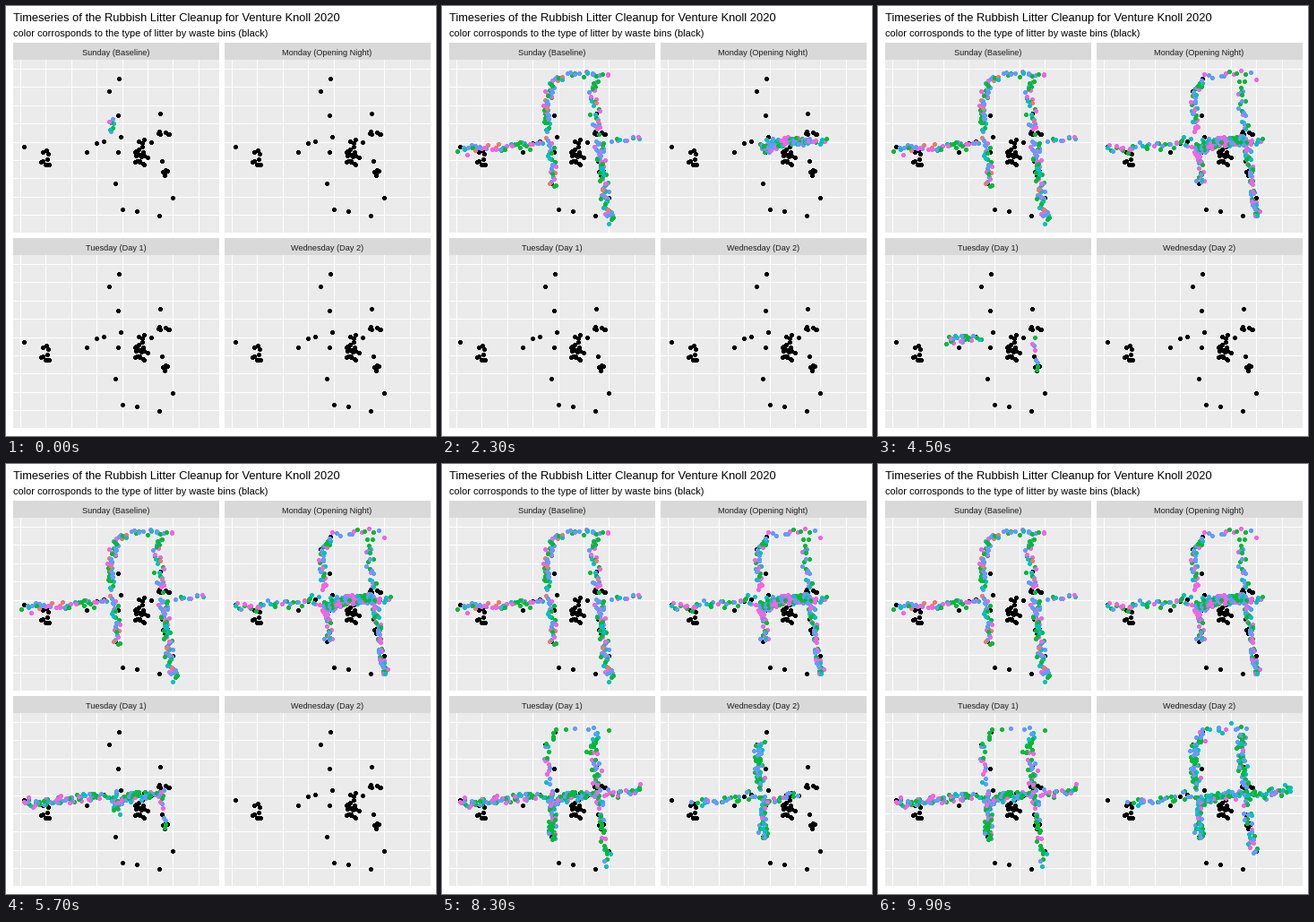
A matplotlib script for the animation above (10000 ms loop, 480x480 px).

```python
import numpy as np
import matplotlib.pyplot as plt
from matplotlib.animation import FuncAnimation
from matplotlib.patches import Rectangle

SIZE, FRAMES, STEP = 480, 100, 100
PX = 0.72  # points per pixel at 100 dpi
PITCH = np.array([236, 218])
HUES = {"r": "#F8766D", "g": "#00BA38", "t": "#00BFC4",
        "b": "#619CFF", "p": "#F564E3", "k": "#000000"}

# Streets and bins are shared by all panels, in pixels of the first one
STREETS = {
    "up": [(118, 140), (116, 112), (119, 97), (125, 82)],
    "down": [(121, 150), (122, 175), (124, 200)],
    "top": [(127, 79), (155, 76), (187, 78)],
    "right": [(171, 82), (167, 100), (171, 122), (174, 142)],
    "mid": [(122, 160), (142, 152), (176, 150)],
    "east": [(178, 151), (202, 149), (224, 145)],
    "west": [(112, 152), (75, 156), (42, 159), (20, 160)],
    "south": [(174, 152), (178, 182), (183, 210), (187, 240)],
}
LONE_BINS = [(126, 81), (115, 95), (125, 122), (172, 120), (128, 146),
             (109, 151), (101, 153), (90, 163), (125, 163), (20, 157),
             (122, 198), (186, 214), (130, 227), (146, 229), (171, 234)]
# Centre, spread and number of bins
BIN_GROUPS = [((151, 167), (5, 6), 24), ((44, 169), (2, 8), 9),
              ((171, 143), (1, 1), 3), ((181, 143), (2, 1), 3),
              ((178, 186), (2, 5), 6)]

# Title, start and end in ms, colour mix, then (street, pieces, share walked)
DAYS = [
    ("Sunday (Baseline)", 0, 1700, "gggttbbbppr",
     [("up", 45, 1), ("top", 22, 1), ("right", 32, 1), ("west", 46, 1),
      ("down", 30, 1), ("east", 12, 1), ("south", 75, 1)]),
    ("Monday (Opening Night)", 1700, 4150, "gggttbbbppp",
     [("mid", 96, 1), ("east", 8, 0.4), ("down", 36, 1), ("up", 34, 1),
      ("top", 13, 1), ("right", 22, 1), ("mid", 48, 1), ("west", 42, 1),
      ("mid", 48, 1), ("south", 58, 0.95)]),
    ("Tuesday (Day 1)", 4200, 7100, "ggggtbbpp",
     [("south", 8, 0.45), ("west", 80, 1), ("mid", 66, 1), ("down", 40, 1),
      ("up", 18, 1), ("top", 6, 1), ("right", 40, 1), ("east", 20, 1),
      ("down", 14, 1), ("south", 26, 0.9)]),
    ("Wednesday (Day 2)", 7200, 9900, "ggggttbbbp",
     [("mid", 20, 0.7), ("down", 50, 1), ("west", 28, 0.75), ("up", 64, 1),
      ("top", 12, 0.8), ("south", 30, 0.75), ("right", 60, 1),
      ("mid", 50, 1), ("east", 36, 1)]),
]

rng = np.random.default_rng(20)


def walk(street, n, share):
    """Scatter n points, in order, along the first part of a street."""
    route = np.array(STREETS[street], float)
    reach = np.r_[0, np.cumsum(np.hypot(*np.diff(route, axis=0).T))]
    s = (np.arange(n) + rng.random(n)) / n * share * reach[-1]
    path = np.column_stack([np.interp(s, reach, c) for c in route.T])
    return path + rng.normal(0, 2.4, (n, 2))


def corner(i):
    return PITCH * [i % 2, i // 2]


def all_points():
    """Times, places and colours of every dot, in order of appearance."""
    bins = np.vstack([LONE_BINS] + [rng.normal(mid, spread, (n, 2))
                                    for mid, spread, n in BIN_GROUPS])
    times, spots, kinds = [], [], []
    for i in range(len(DAYS)):
        times.append(np.full(len(bins), -1.0))
        spots.append(bins + corner(i))
        kinds.append(["k"] * len(bins))
    for i, (_, start, end, mix, route) in enumerate(DAYS):
        xy = np.vstack([walk(*leg) for leg in route])
        times.append(np.linspace(start, end, len(xy)))
        spots.append(xy + corner(i))
        kinds.append(rng.choice(list(mix), len(xy)))
    colors = np.array([HUES[k] for k in np.concatenate(kinds)])
    return np.concatenate(times), np.round(np.vstack(spots)) + 0.5, colors


times, spots, colors = all_points()

plt.rcParams["font.family"] = "Liberation Sans"
fig = plt.figure(figsize=(4.8, 4.8), dpi=100, facecolor="white")
ax = fig.add_axes([0, 0, 1, 1])
ax.set(xlim=(0, SIZE), ylim=(SIZE, 0))
ax.axis("off")


def label(x, y, text, px, color="black", ha="left"):
    ax.text(x, y, text, fontsize=px * PX, color=color, ha=ha, va="baseline")


def box(x, y, w, h, color):
    ax.add_patch(Rectangle((x, y), w, h, fc=color, lw=0, antialiased=False))


def panel(x, y, title):
    box(x, y, 230, 19, "#D9D9D9")
    box(x, y + 19, 230, 193, "#EBEBEB")
    for k in range(8):
        box(x + round(8 + 28.4 * k), y + 19, 1, 193, "white")
    for k in range(9):
        box(x, y + round(29 + 20.4 * k), 230, 1, "white")
    label(x + 114.5, y + 14, title, 9.2, "#1A1A1A", "center")


label(8, 17, "Timeseries of the Rubbish Litter Cleanup for Venture Knoll 2020", 12.9)
label(8, 34, "color corrosponds to the type of litter by waste bins (black)", 11)
for i, day in enumerate(DAYS):
    panel(*(corner(i) + [8, 41]), day[0])

dots = ax.scatter([], [], s=(4.2 * PX) ** 2, lw=0, antialiased=False, zorder=4)


def update(i):
    n = np.searchsorted(times, (i + 0.5) * STEP)
    dots.set_offsets(spots[:n])
    dots.set_facecolor(colors[:n])
    return [dots]


anim = FuncAnimation(fig, update, frames=FRAMES, interval=STEP,
                     init_func=lambda: update(0), repeat=True, repeat_delay=0)
plt.show()
```
